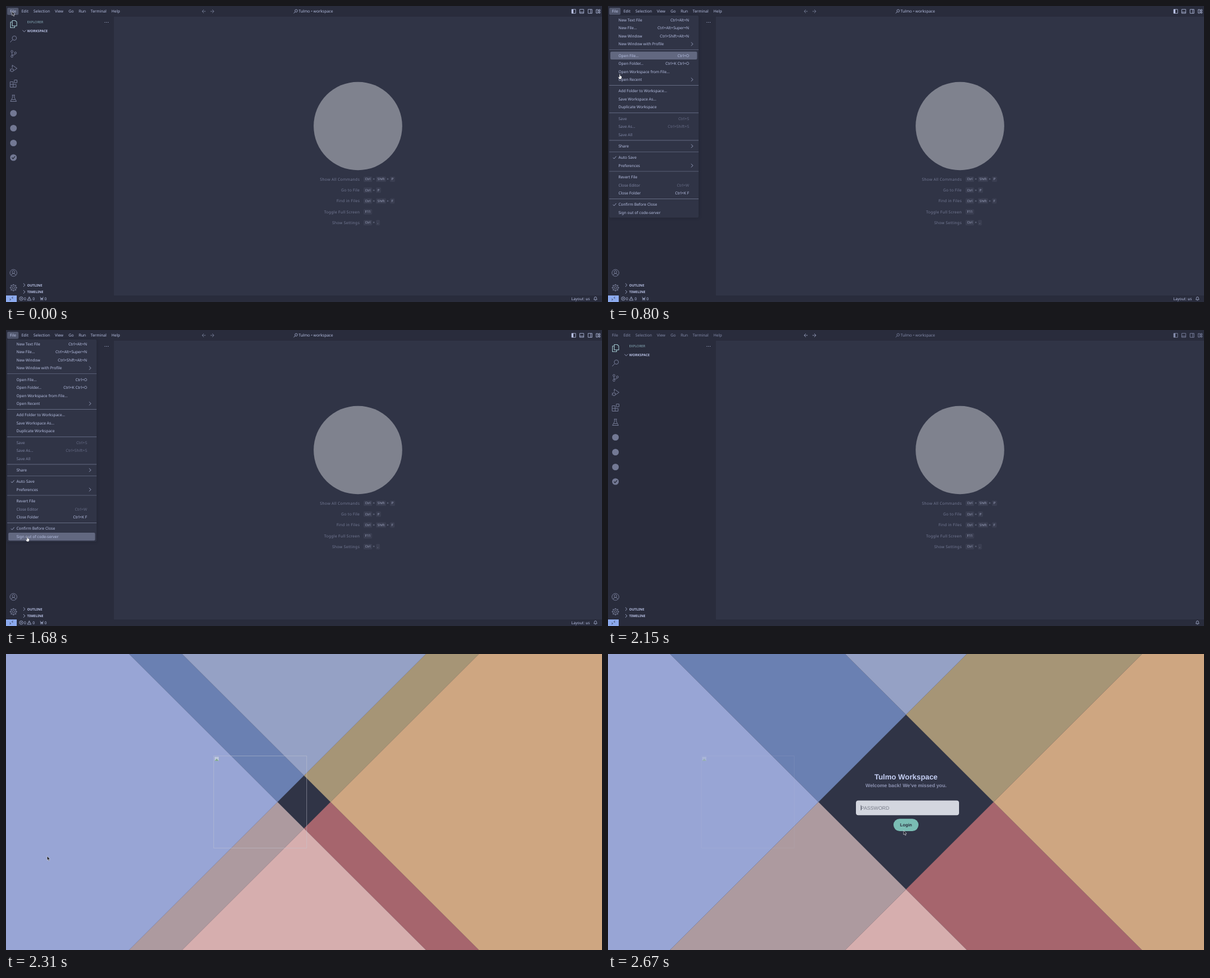
Recreate the animation shown at these times as an HTML page with a canvas. Size 1000 by 498 pixels, loop 2.78 s.

```html
<!DOCTYPE html>
<html lang="en">
<head>
<meta charset="utf-8">
<title>Signing out</title>
<style>
html, body { margin: 0; width: 100%; height: 100%; overflow: hidden; background: #303446; }
canvas { display: block; width: 1000px; height: 498px; }
</style>
</head>
<body>
<canvas id="stage" width="1000" height="498"></canvas>
<script>
const ctx = document.getElementById('stage').getContext('2d');
ctx.textRendering = 'geometricPrecision';
const LOOP = 2780, NAME = 'Tulmo';
const MENU_OPENS = 540, MENU_CLOSES = 1990, LOGIN_SHOWS = 2170;
const UI = '"Noto Sans", sans-serif', FORM = '"Liberation Sans", Arial, sans-serif';
const BASE = '#303446', MANTLE = '#292c3c', TEXT = '#b7c0e3', DIM = '#737994', HOVER = '#626880';

// Moments at which the picture changes; the early pointer motion runs evenly.
const changes = [0, 30, ...Array.from({ length: 26 }, (_, i) => MENU_OPENS + i * 20),
  1070, 1120, 1220, 1300, 1400, 1530, 1680, 1990, 2150, 2170, 2210, 2250,
  2310, 2390, 2480, 2590, 2670];

const menu = `New Text File|Ctrl+Alt+N
New File...|Ctrl+Alt+Super+N
New Window|Ctrl+Shift+Alt+N
New Window with Profile|>
-
Open File...|Ctrl+O
Open Folder...|Ctrl+K Ctrl+O
Open Workspace from File...
Open Recent|>
-
Add Folder to Workspace...
Save Workspace As...
Duplicate Workspace
-
!Save|Ctrl+S
!Save As...|Ctrl+Shift+S
!Save All
-
Share|>
-
*Auto Save
Preferences|>
-
Revert File
!Close Editor|Ctrl+W
Close Folder|Ctrl+K F
-
*Confirm Before Close
Sign out of code-server`.split('\n');

let rowY = 10;
const rows = menu.map(line => {
  if (line === '-') { rowY += 5.8; return { separator: true, y: rowY + 3.8 }; }
  rowY += 13.5;
  const [label, keys] = line.replace(/^[!*]/, '').split('|');
  return { label, keys, y: rowY, off: line[0] === '!', checked: line[0] === '*' };
});

function text(str, x, y, color = TEXT, size = 6.5, { align = 'left', weight = 400, font = UI, spacing = 0 } = {}) {
  ctx.font = `${weight} ${size}px ${font}`;
  ctx.letterSpacing = spacing + 'px';
  ctx.textAlign = align;
  ctx.textBaseline = 'alphabetic';
  ctx.fillStyle = color;
  ctx.fillText(str, x, y + size * 0.355);
}

function rect(x, y, w, h, color, r = 0) {
  ctx.fillStyle = color;
  ctx.beginPath();
  ctx.roundRect(x, y, w, h, r);
  ctx.fill();
}

function disc(x, y, r, color) {
  ctx.fillStyle = color;
  ctx.beginPath();
  ctx.arc(x, y, r, 0, 7);
  ctx.fill();
}

function icon(path, x, y, color = DIM, width = 1, fill) {
  ctx.save();
  ctx.translate(x, y);
  const shape = new Path2D(path);
  if (fill) { ctx.fillStyle = fill; ctx.fill(shape); }
  ctx.strokeStyle = color;
  ctx.lineWidth = width;
  ctx.lineJoin = 'round';
  ctx.stroke(shape);
  ctx.restore();
}

const ring = (r, x = 0, y = 0) => `M${x + r} ${y}a${r} ${r} 0 1 1 ${-2 * r} 0a${r} ${r} 0 1 1 ${2 * r} 0`;
const CHEVRON = 'M-1.5-2.8L1.5 0L-1.5 2.8', CHECK = 'M-2.6 0L-.7 2L2.8-2.2';
const SEARCH = ring(3.6, 1.5, -1.5) + 'M-1 1L-5.5 5.5';

function titleBar(active, lit) {
  const color = active ? TEXT : '#858cab';
  if (lit) rect(2, 3, 19, 12, '#51576d', 2);
  [['File', 6.5], ['Edit', 26], ['Selection', 46], ['View', 82], ['Go', 105], ['Run', 122],
    ['Terminal', 142], ['Help', 177]].forEach(([label, x]) => text(label, x, 9, color));
  const arrowColor = active ? '#838ba7' : '#a5adce';
  icon('M3 0H-3M0-3L-3 0L0 3', 332, 9, arrowColor, .7);
  icon('M-3 0H3M0-3L3 0L0 3', 346, 9, arrowColor, .7);
  ctx.save();
  ctx.translate(486, 9);
  ctx.scale(.6, .6);
  icon(SEARCH, 0, 0, color, 1.2);
  ctx.restore();
  text(NAME + ' • workspace', 491, 9, color);
  const frame = 'M-3.3-3.3H3.3V3.3H-3.3Z';
  icon(frame, 952.5, 9, color, .8);
  rect(949, 5.7, 3, 6.6, color);
  icon(frame + 'M-3.3 1.3H3.3', 966, 9, color, .8);
  icon(frame + 'M1-3.3V3.3', 980, 9, color, .8);
  icon('M-3.3-3H-.5V3H-3.3ZM1-3H3.3V-.5H1ZM1 1H3.3V3H1Z', 993.5, 9, color, .8);
}

function sideBar() {
  icon('M-2-6H3L5.5-3.5V3H-2ZM-2-3.5H-5V6H2V3', 12.5, 30.5, '#98bcc4', 1.1);
  icon(SEARCH, 12.5, 55.5);
  icon(ring(1.7, -2.5, -4) + ring(1.7, -2.5, 4.2) + ring(1.7, 3.2, -1.5) + 'M-2.5-2.3V2.5M3.2 .2Q3 2-2.5 2.2', 12.5, 80.5);
  icon('M-2-1V-5.5L6 0L0 4' + ring(2.5, -2.5, 3) + 'M-6 1L-4.5 2M-6.3 4H-5M0 1L-1 2', 12.5, 105);
  icon('M-5.5-3H-.5V6H-5.5ZM-5.5 1.5H4.5V6H-.5M1.5-6H6V-1.5H1.5Z', 12.5, 130.5);
  icon('M-2.5-5.5H2.5M-1.5-5.5V-1.5L-5 5H5L1.5-1.5V-5.5M-3 2H3', 12.5, 155.5);
  [180.5, 205.5, 230.5, 255].forEach(y => disc(12.5, y, 5.6, DIM));
  icon(CHECK, 12.5, 255, MANTLE, 1.2);
  text('EXPLORER', 35.5, 27.5, '#8bb0bd', 5.6);
  icon('M-2.8-1.3L0 1.5L2.8-1.3', 30.5, 42, TEXT, .7);
  text('WORKSPACE', 35.5, 42, TEXT, 5.7, { weight: 700 });
}

function keyHint(label, keys, y) {
  text(label, 593.5, y, DIM, 6.5, { align: 'right', spacing: .26 });
  let x = 600;
  keys.split('+').forEach((key, i) => {
    if (i) { text('+', x + 1.2, y, '#959cb8', 5.6); x += 6.5; }
    ctx.font = `5.6px ${UI}`;
    ctx.letterSpacing = '0px';
    const w = ctx.measureText(key).width + 5;
    rect(x, y - 4.5, w, 9, '#3a3e51', 1.5);
    text(key, x + 2.5, y, '#a0a7c3', 5.6);
    x += w;
  });
}

function workbench(active, lit) {
  rect(0, 0, 1000, 498, MANTLE);
  rect(181, 18, 819, 469, BASE);
  titleBar(active, lit);
  sideBar();
  [166, 168.7, 171.4].forEach(x => disc(x, 27.5, .6, TEXT));
  icon(ring(5.8) + ring(2.2, 0, -1.5) + 'M-4 4Q-3 1 0 1T4 4', 12.5, 449);
  icon(ring(2) + ring(4.4), 12.5, 474, DIM, 1);
  for (let i = 0; i < 8; i++) {
    const a = i * Math.PI / 4, c = Math.cos(a), s = Math.sin(a);
    icon(`M${4.4 * c} ${4.4 * s}L${6 * c} ${6 * s}`, 12.5, 474, DIM, 1.8);
  }
  [['OUTLINE', 469.5], ['TIMELINE', 481]].forEach(([label, y]) => {
    icon(CHEVRON, 30.5, y, TEXT, .7);
    text(label, 35.5, y, TEXT, 5.7, { weight: 700 });
  });

  disc(590.5, 202, 74.3, '#7f828e');
  [['Show All Commands', 'Ctrl+Shift+P'], ['Go to File', 'Ctrl+P'], ['Find in Files', 'Ctrl+Shift+F'],
    ['Toggle Full Screen', 'F11'], ['Show Settings', 'Ctrl+,']]
    .forEach(([label, keys], i) => keyHint(label, keys, 291.5 + i * 18.25));

  rect(0, 487, 18, 11, '#8caaee');
  icon('M-3 .2L-.8 1.5L-3 3M3-3L.8-1.5L3 0', 9, 492.3, '#303446', .7);
  icon('M-2.6 2Q-1.8 1-1.8-.8A1.8 1.8 0 0 1 1.8-.8Q1.8 1 2.6 2ZM-.8 3H.8', 989, 492, TEXT, .7);
  if (!active) return;
  icon(ring(3) + 'M-1.2-1.2L1.2 1.2M1.2-1.2L-1.2 1.2', 25.5, 492.3, TEXT, .7);
  text('0', 30, 492.3);
  icon('M0-3L3.2 2.8H-3.2ZM0-1V1', 39, 492.3, TEXT, .7);
  text('0', 44.5, 492.3);
  icon('M-2.5-2.8L-1 0H1L2.5-2.8M-2.5 0H2.5M0 0V3M-2 3L-1 0M2 3L1 0', 60, 492.3, TEXT, .7);
  text('0', 64.5, 492.3);
  text('Layout: us', 948.5, 492.3);
}

const rowAt = y => rows.find(r => !r.separator && !r.off && Math.abs(r.y - y) < 6.8);

function fileMenu(hovered) {
  ctx.save();
  ctx.shadowColor = '#1b1d2a80';
  ctx.shadowBlur = 4;
  rect(2, 16, 150, 340, BASE, 2);
  ctx.restore();
  for (const row of rows) {
    const { y, keys, off } = row;
    if (row.separator) { rect(2, y - .4, 150, .9, HOVER); continue; }
    if (row === hovered) rect(4, y - 6.6, 145.5, 13.2, HOVER, 2);
    text(row.label, 17.5, y, off ? '#7f86a4' : TEXT);
    if (row.checked) icon(CHECK, 11, y, TEXT, .7);
    if (keys === '>') icon(CHEVRON, 141, y, TEXT, .7);
    else if (keys) text(keys, 136, y, off ? '#666c86' : TEXT, 6.5, { align: 'right' });
  }
}

function pointer(x, y, hand) {
  if (hand) icon('M0 0Q1-1 1.4 0V2.5L4 3.2V6L3 8H0L-2 5L-1.5 4L0 5Z', x, y, '#303446', .5, '#fff');
  else icon('M0 0V7L1.6 5.6L2.8 8.2L4 7.6L2.9 5.2H5Z', x, y, '#e4e6ee', .6, '#1c1d25');
}

// Linear interpolation through [time, x, y] points.
function along(points, t) {
  if (t <= points[0][0]) return points[0].slice(1);
  for (let i = 1; i < points.length; i++) {
    const [t0, x0, y0] = points[i - 1], [t1, x1, y1] = points[i];
    if (t <= t1) {
      const k = (t - t0) / (t1 - t0);
      return [x0 + (x1 - x0) * k, y0 + (y1 - y0) * k];
    }
  }
  return points.at(-1).slice(1);
}
const menuPath = [[540, 10, 9], [680, 14, 50], [800, 19, 115], [1040, 26, 264], [1120, 27.5, 281],
  [1300, 33, 333], [1530, 35, 348]];
const loginPath = [[2170, 45, 346], [2310, 69, 340], [2480, 330, 312], [2590, 470, 299], [2670, 496, 297]];
const HOVER_LAG = 50;

const clamp = v => Math.min(1, Math.max(0, v));

// cubic-bezier(.445, .05, 0, 1), solved by bisection
function ease(x) {
  x = clamp(x);
  let lo = 0, hi = 1;
  for (let i = 0; i < 24; i++) {
    const m = (lo + hi) / 2, n = 1 - m;
    if (1.335 * n * n * m + m ** 3 < x) lo = m; else hi = m;
  }
  return .15 * (1 - lo) ** 2 * lo + 3 * (1 - lo) * lo * lo + lo ** 3;
}

const tiles = [
  ['#98a5d5', '#6a80b2', '#ad9a9f', '#d6aeae'],
  ['#95a1c5', '#a69576', '#a6656d', '#cea681']
];

function loginPage(t) {
  const half = 147 / Math.SQRT2 * ease((t - LOGIN_SHOWS - 20) / 500), far = 900;
  const [[left, upLeft, downLeft, bottom], [top, upRight, downRight, right]] = tiles;
  rect(0, 0, 1000, 498, BASE);
  ctx.save();
  ctx.translate(500, 249);
  ctx.rotate(Math.PI / 4);
  rect(-far, -half, far - half, 2 * half, upLeft);
  rect(half, -half, far, 2 * half, downRight);
  rect(-half, -far, 2 * half, far - half, upRight);
  rect(-half, half, 2 * half, far, downLeft);
  rect(-far, half, far - half, far, left);
  rect(-far, -far, far - half, far - half, top);
  rect(half, half, far, far, bottom);
  rect(half, -far, far, far - half, right);
  ctx.restore();

  const slide = ease((t - 2310) / 340);
  const boxX = 348.5 - 192 * slide;
  ctx.globalAlpha = .55 - .4 * slide;
  icon('M0 0H156V155H0Z', boxX, 171.5, '#c4c6d2', .8);
  ctx.globalAlpha = .9 - .5 * slide;
  rect(boxX + 1.5, 173, 7, 7, '#c3cddd');
  icon('M2 8L5 5L8 8Z', boxX, 171.5, '#78a383', .5, '#78a383');

  ctx.globalAlpha = ease((t - 2395) / 275);
  const centered = { align: 'center', weight: 700, font: FORM };
  text(NAME + ' Workspace', 500, 206.3, '#c6d0f5', 12.45, centered);
  text("Welcome back! We've missed you.", 500, 221.3, '#8c92b1', 8.29, centered);
  rect(416, 246.5, 173, 24.7, '#d3d6df', 4);
  text('PASSWORD', 424.3, 258.7, '#777b88', 8.3, { font: FORM });
  rect(424, 254.5, .7, 8.5, '#303446');
  rect(479, 277.3, 42, 20.6, '#7abdb4', 10.3);
  text('Login', 500, 287.6, '#292c3c', 7.3, centered);
  ctx.globalAlpha = 1;
  pointer(...along(loginPath, t));
}

function draw(now) {
  const clock = now % LOOP;
  const t = changes.findLast(c => c <= clock + .01);
  if (t >= LOGIN_SHOWS) return loginPage(t);
  const leaving = t >= MENU_CLOSES;
  workbench(!leaving, !leaving);
  if (leaving) return;
  const open = t >= MENU_OPENS;
  const [x, y] = along(menuPath, t);
  if (open) fileMenu(rowAt(along(menuPath, t - HOVER_LAG)[1]));
  pointer(x, y, open ? rowAt(y) : t >= 30);
}

const start = performance.now();
function tick() {
  draw(performance.now() - start);
  requestAnimationFrame(tick);
}
tick();
</script>
</body>
</html>
```
